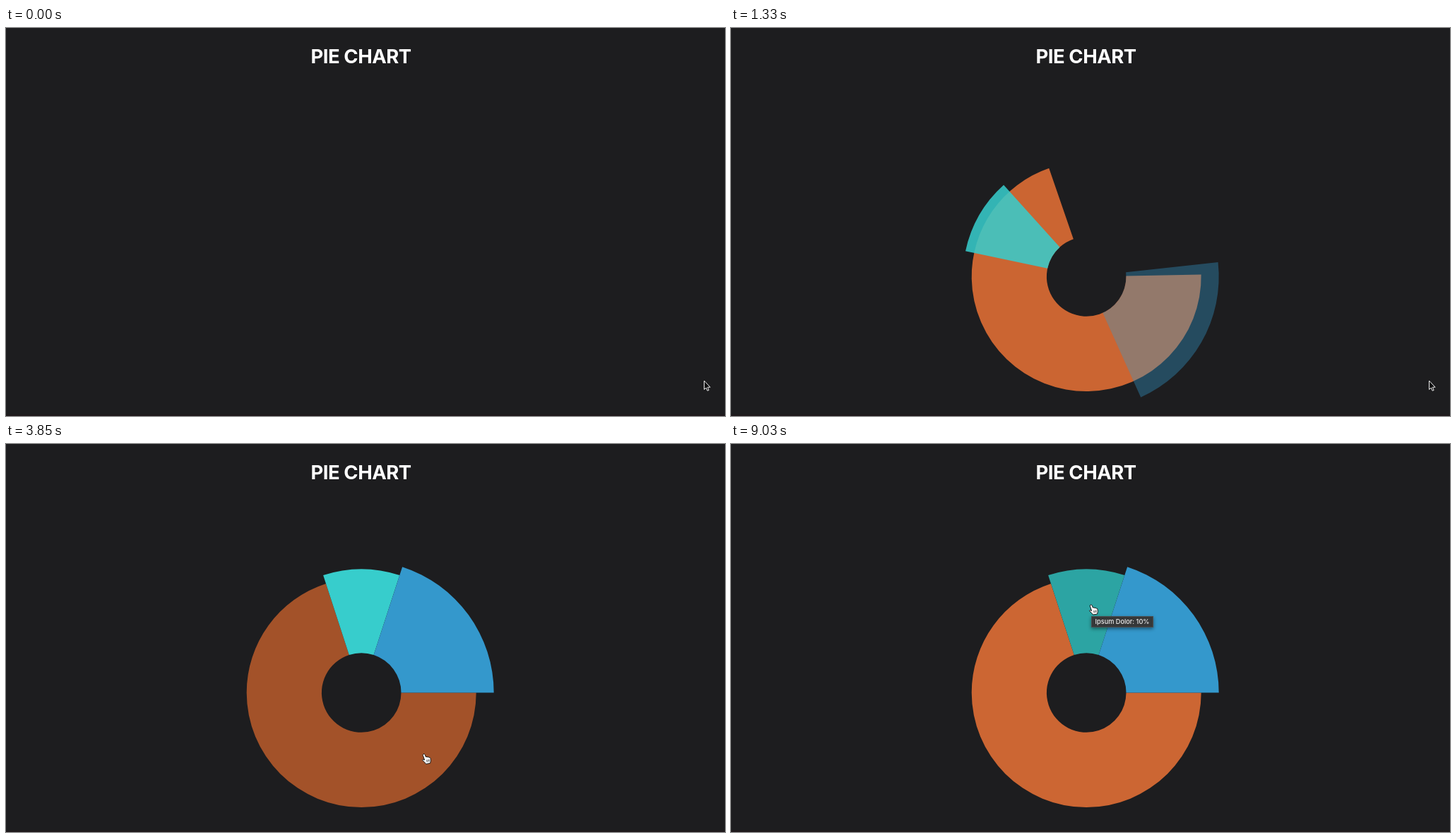
Write an HTML page with a canvas that moves like this. It is 1018x550 px and loops after 9.1 s.

```html
<!DOCTYPE html>
<html lang="en">
<head>
<meta charset="utf-8">
<title>Pie chart</title>
<style>
  html, body { margin: 0; width: 100%; height: 100%; overflow: hidden; background: #1d1d1f; }
  canvas { display: block; }
</style>
</head>
<body>
<canvas id="stage" width="1018" height="550"></canvas>
<script>
const ctx = document.getElementById('stage').getContext('2d');
const LOOP = 9100, STEP = 70;
const CX = 503.2, CY = 352.5, INNER = 56.3;
const SPIN = 1080, STAGGER = 360, FIRST_START = 358, FIRST_PAINT = 560;
const RAD = Math.PI / 180;

// Angles in degrees, clockwise from east.
const slices = [
  { label: 'Lorem: 70%', from: 0, sweep: 252, radius: 162.5, rgb: [204, 102, 51] },
  { label: 'Ipsum Dolor: 10%', from: 252, sweep: 36, radius: 175, rgb: [55, 205, 204] },
  { label: 'Sit Amet: 20%', from: 288, sweep: 72, radius: 187.5, rgb: [52, 152, 204] },
];

const moves = [
  { start: 2870, end: 3780, to: [592, 439.5] },
  { start: 5740, end: 6370, to: [584, 263] },
  { start: 7490, end: 8190, to: [510, 228] },
];

const tooltips = [
  { start: 4970, end: 6090, slice: 0, at: [592, 454] },
  { start: 7210, end: 7770, slice: 2, at: [584, 278] },
  { start: 9030, end: 9100, slice: 1, at: [510, 244] },
];

const arrow = new Path2D('M0 0V12.4L2.8 10L4.6 14.2L6.6 13.4L4.8 9.2H8.6Z');
const hand = new Path2D('M-1 0Q.6 -.6 1.2 1L2.4 4Q4.4 3.4 5 4.4Q6.6 3.8 7.2 5Q8.6 4.6 9 6L9.4 9.5L8.6 13L2.6 14Q.5 11 -2.2 9Q-2.8 7.8 -1.4 7.6L.6 8.4L-1.6 2Q-2.1 .6 -1 0Z');
const fingers = new Path2D('M3.4 8.2L4.2 11.4M5.2 7.8L5.9 11M6.9 7.4L7.5 10.6');

const clamp01 = v => Math.min(1, Math.max(0, v));

// cubic-bezier(.25, .1, .25, 1)
function ease(x) {
  if (x <= 0 || x >= 1) return clamp01(x);
  const bezier = (a, b, u) => 3 * a * u * (1 - u) ** 2 + 3 * b * u * u * (1 - u) + u ** 3;
  let low = 0, high = 1;
  for (let i = 0; i < 24; i++) {
    const mid = (low + high) / 2;
    if (bezier(.25, .25, mid) < x) low = mid; else high = mid;
  }
  return bezier(.1, 1, low);
}

function cursorAt(t) {
  let pos = [988.5, 500];
  for (const { start, end, to } of moves) {
    const p = ease((t - start) / (end - start));
    pos = pos.map((v, i) => v + (to[i] - v) * p);
  }
  return pos;
}

function sliceAt([x, y]) {
  const distance = Math.hypot(x - CX, y - CY);
  const angle = (Math.atan2(y - CY, x - CX) / RAD + 360) % 360;
  return slices.find(s => distance > INNER && distance < s.radius &&
    angle >= s.from && angle < s.from + s.sweep);
}

// Every slice fades in while its leading edge turns from -180 degrees to its place.
function drawSlice(slice, index, t, hovered) {
  const p = ease((t - FIRST_START - index * STAGGER) / SPIN);
  if (t < FIRST_PAINT || p === 0) return;
  const from = (-180 + (slice.from + 180) * p) * RAD;
  const to = from + slice.sweep * RAD;
  const shade = slice === hovered ? .8 : 1;
  ctx.globalAlpha = p;
  ctx.fillStyle = `rgb(${slice.rgb.map(c => Math.round(c * shade))})`;
  ctx.beginPath();
  ctx.arc(CX, CY, slice.radius, from, to);
  ctx.arc(CX, CY, INNER, to, from, true);
  ctx.fill();
  ctx.globalAlpha = 1;
}

function drawTooltip({ slice, at: [x, y] }) {
  const text = slices[slice].label;
  ctx.font = '500 9.2px Inter, sans-serif';
  ctx.letterSpacing = '0px';
  ctx.textAlign = 'left';
  const width = Math.round(ctx.measureText(text).width) + 11;
  ctx.save();
  ctx.shadowColor = 'rgba(0,0,0,.45)';
  ctx.shadowBlur = 5;
  ctx.shadowOffsetY = 2;
  ctx.fillStyle = '#363839';
  ctx.fillRect(x, y, width, 16);
  ctx.restore();
  ctx.strokeStyle = '#4b4d4e';
  ctx.lineWidth = 1;
  ctx.strokeRect(x + .5, y + .5, width - 1, 15);
  ctx.fillStyle = '#f0f0f0';
  ctx.fillText(text, x + 5.5, y + 11.3);
}

function drawCursor([x, y], isHand) {
  ctx.save();
  ctx.translate(x, y);
  ctx.lineJoin = 'round';
  ctx.lineWidth = 1;
  ctx.fillStyle = isHand ? '#fff' : '#0c0c0d';
  ctx.strokeStyle = isHand ? '#161616' : '#eee';
  const shape = isHand ? hand : arrow;
  ctx.fill(shape);
  ctx.stroke(shape);
  if (isHand) {
    ctx.lineWidth = .7;
    ctx.stroke(fingers);
  }
  ctx.restore();
}

function draw(t) {
  ctx.fillStyle = '#1d1d1f';
  ctx.fillRect(0, 0, 1018, 550);
  ctx.fillStyle = '#1f181b';
  ctx.fillRect(0, 548, 1018, 2);

  ctx.fillStyle = '#fff';
  ctx.font = '700 27.5px Inter, sans-serif';
  ctx.letterSpacing = '-0.5px';
  ctx.textAlign = 'center';
  ctx.fillText('PIE CHART', 502.6, 50.3);

  const cursor = cursorAt(t);
  const hovered = sliceAt(cursor);
  slices.forEach((slice, i) => drawSlice(slice, i, t, hovered));
  tooltips.filter(tip => t >= tip.start && t < tip.end).forEach(drawTooltip);
  drawCursor(cursor, Boolean(hovered));
}

function tick() {
  const t = performance.now() % LOOP;
  draw(Math.floor(t / STEP) * STEP);
  requestAnimationFrame(tick);
}
tick();
</script>
</body>
</html>
```
